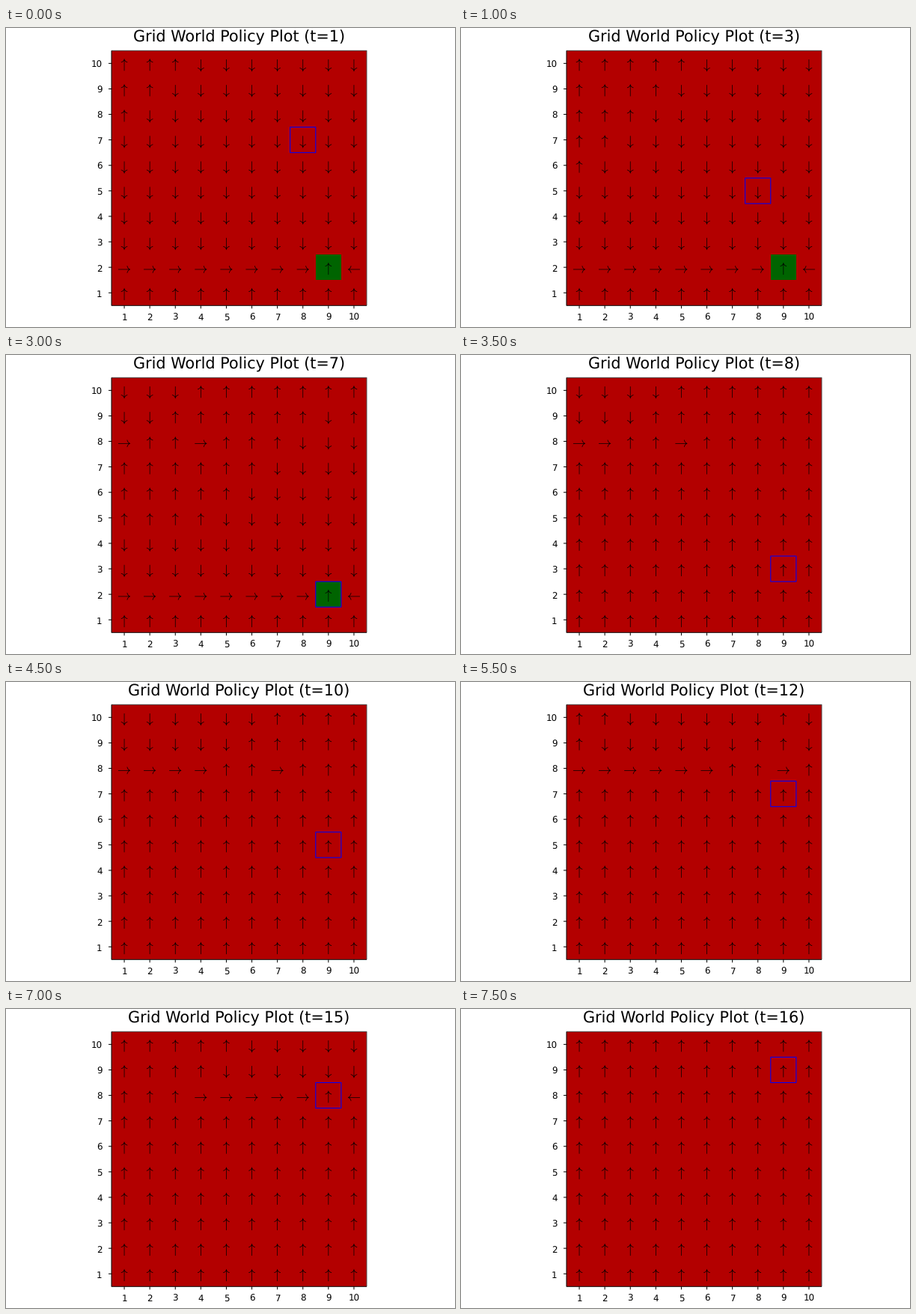
A matplotlib script that plays this animation: 600 px wide and 400 px high, repeating every 8 s.

```python
import matplotlib.pyplot as plt
from matplotlib.animation import FuncAnimation
from matplotlib.patches import PathPatch, Rectangle
from matplotlib.path import Path
from matplotlib.textpath import TextPath
from matplotlib.transforms import Affine2D

plt.rcParams.update({"font.family": "DejaVu Sans", "mathtext.fontset": "cm",
                     "text.hinting": "none"})

W, H, DPI = 600, 400, 100
N, STEPS = 10, 16
LEFT, BOTTOM, CELL = 141, H - 371.3, 34.1
SPAN = N * CELL
FIRST, SECOND = (9, 2), (9, 8)   # visit FIRST, then SECOND
OPEN, DEADLINE = 15, 20          # when SECOND counts
GAMMA = 0.95
MOVES = [(0, 1), (0, -1), (-1, 0), (1, 0)]
# glyph and how far it sits below the cell centre
ARROWS = [("uparrow", 1.8), ("downarrow", 2.8),
          ("leftarrow", 2.8), ("rightarrow", 2.8)]
CELLS = [(x, y) for x in range(1, N + 1) for y in range(1, N + 1)]


def px(points):
    return points * 72 / DPI


def step(cell, move):
    return tuple(min(max(c + m, 1), N) for c, m in zip(cell, move))


def solve():
    """Backward induction over time; ties go to the earliest move."""
    policy = {}
    ahead = [dict.fromkeys(CELLS, 0.0) for _ in range(3)]
    for t in range(DEADLINE, 0, -1):
        now = [{}, {}, dict.fromkeys(CELLS, 0.0)]
        for stage in range(3):
            for cell in CELLS:
                done = stage < 2 and cell == SECOND and t >= OPEN
                found = stage == 0 and cell == FIRST
                nxt = 2 if done else stage + found
                scores = [ahead[nxt][step(cell, m)] for m in MOVES]
                best = max(scores)
                policy[t, stage, cell] = next(
                    i for i, s in enumerate(scores) if s > best - 1e-9)
                if stage < 2:
                    gain = GAMMA ** t if done or found else 0
                    now[stage][cell] = gain + (0 if done else best)
        ahead = now
    return policy


def walk(policy, cell=(8, 7)):
    stage, trail = 0, []
    for t in range(1, STEPS + 1):
        trail.append((cell, stage))
        move = MOVES[policy[t, stage, cell]]
        if stage == 0 and cell == FIRST:
            stage = 1
        elif stage == 1 and cell == SECOND and t >= OPEN:
            stage = 2
        cell = step(cell, move)
    return trail


def corner(cell):
    return LEFT + (cell[0] - 1) * CELL, BOTTOM + (cell[1] - 1) * CELL


def arrow(name, drop):
    path = TextPath((0, 0), rf"$\{name}$", size=18.4)
    box = path.get_extents()
    return path.transformed(Affine2D().translate(
        (CELL - box.x0 - box.x1) / 2, (CELL - box.y0 - box.y1) / 2 - drop))


policy = solve()
trail = walk(policy)
arrows = [arrow(*a) for a in ARROWS]

fig = plt.figure(figsize=(W / DPI, H / DPI), dpi=DPI, facecolor="white")
ax = fig.add_axes([0, 0, 1, 1])
ax.set(xlim=(0, W), ylim=(0, H))
ax.axis("off")


def line(xs, ys, color="black"):
    ax.plot(xs, ys, color=color, lw=px(1), snap=False,
            solid_capstyle="butt", solid_joinstyle="miter")


def label(x, y, text, size, align="center"):
    return ax.text(x, y, text, size=px(size), ha=align, va="baseline")


ax.add_patch(Rectangle((LEFT, BOTTOM), SPAN, SPAN, fc=(0.7, 0, 0), lw=0))
goal = ax.add_patch(Rectangle(corner(FIRST), CELL, CELL, fc="darkgreen", lw=0))
right, top = LEFT + SPAN, BOTTOM + SPAN
line([LEFT, right, right], [top, top, BOTTOM], "0.3")
line([LEFT, LEFT, right], [top, BOTTOM, BOTTOM])

for k in range(1, N + 1):
    x, y = (c + CELL / 2 for c in corner((k, k)))
    line([x, x], [BOTTOM, BOTTOM - 4])
    line([LEFT, LEFT - 4], [y, y])
    label(x, H - 391, k, 11.9)
    label(LEFT - 12.3, y - 5.4, k, 11.9, "right")

title = label(LEFT + SPAN / 2, H - 19, "", 20.8)
signs = ax.add_patch(PathPatch(arrows[0], fc="black", lw=0, snap=False))
agent = ax.add_patch(Rectangle((0, 0), CELL, CELL, fill=False, ec="blue",
                               lw=px(1.05), snap=False))


def update(i):
    cell, stage = trail[i]
    signs.set_path(Path.make_compound_path(*(
        arrows[policy[i + 1, stage, c]].transformed(
            Affine2D().translate(*corner(c))) for c in CELLS)))
    agent.set_xy(corner(cell))
    goal.set_visible(stage == 0)
    title.set_text(f"Grid World Policy Plot (t={i + 1})")
    return signs, agent, goal, title


anim = FuncAnimation(fig, update, frames=STEPS, interval=500,
                     repeat=True, repeat_delay=0)
plt.show()
```
